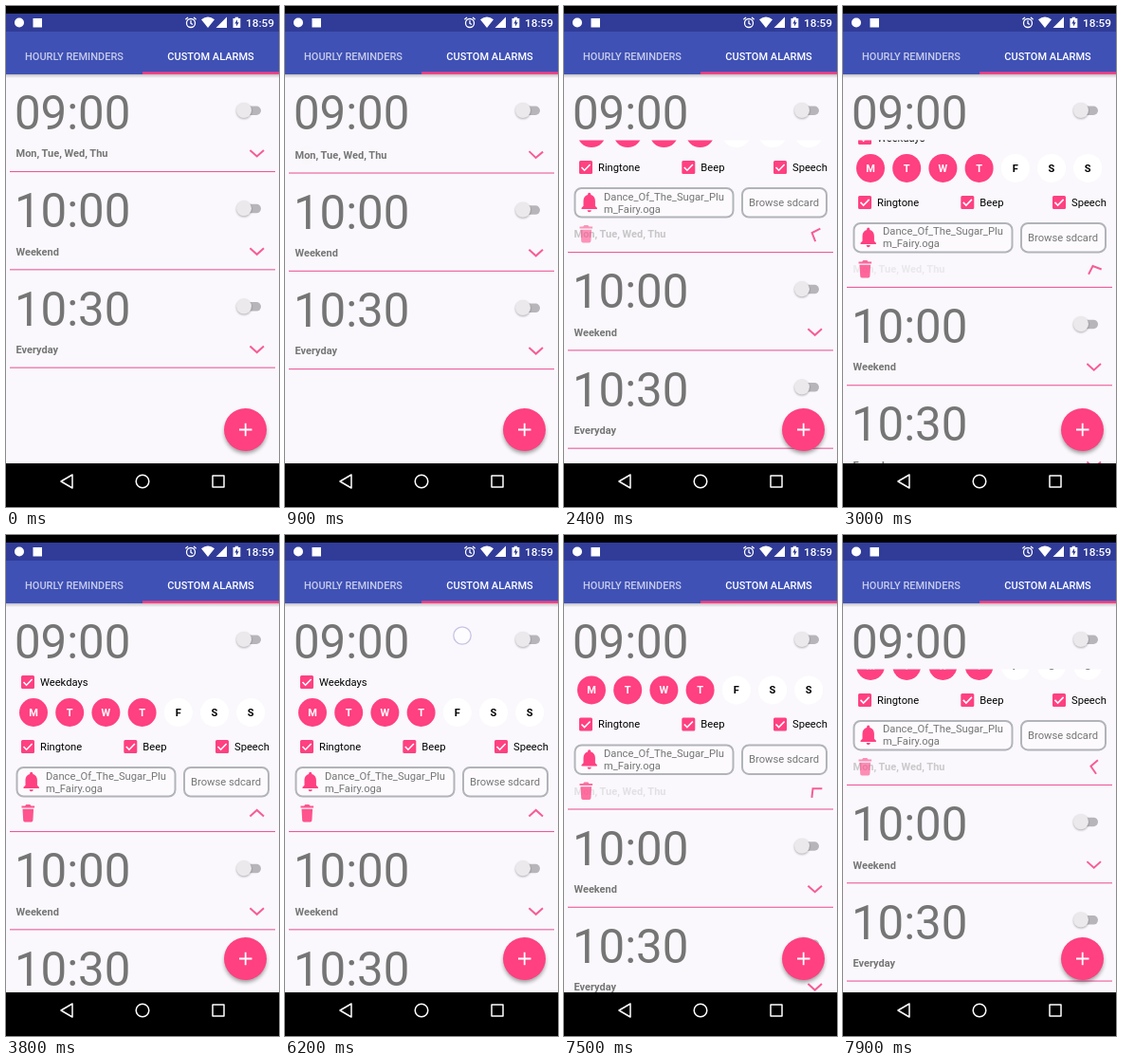
An HTML page that plays this animation: 288 px wide and 528 px high, repeating every 8000 ms.

```html
<!DOCTYPE html>
<html lang="en">
<head>
<meta charset="utf-8">
<title>Custom alarms</title>
<style>
  html, body { margin: 0; width: 100%; height: 100%; overflow: hidden; background: #000; }
  svg { display: block; width: 288px; height: 528px; }
  text { font-family: Roboto, "Liberation Sans", sans-serif; font-size: 11.2px; }
  .tab { font-size: 11px; font-weight: 500; fill: #fff; text-anchor: middle; }
  .time { font-size: 49.2px; fill: #757575; }
  .days { font-size: 11px; font-weight: 700; fill: #757575; }
  .day { font-size: 11px; font-weight: 700; text-anchor: middle; }
  .note { fill: #757575; }
  .box { fill: #fcfafd; stroke: #b1b4b9; stroke-width: 2; }
  .line { fill: #ec5a9a; }
  .arrow { fill: none; stroke: #f75c97; stroke-width: 2; }
</style>
</head>
<body>
<svg viewBox="0 0 288 528">
  <defs>
    <clipPath id="page"><rect y="72" width="288" height="410"/></clipPath>
    <clipPath id="below"><rect y="141.5" width="288" height="341"/></clipPath>
    <linearGradient id="shade" x2="0" y2="1">
      <stop stop-color="#000" stop-opacity=".22"/>
      <stop offset="1" stop-color="#000" stop-opacity="0"/>
    </linearGradient>
    <filter id="blur" x="-50%" y="-50%" width="200%" height="200%"><feGaussianBlur stdDeviation="2.2"/></filter>
    <filter id="soft" x="-50%" y="-50%" width="200%" height="200%"><feGaussianBlur stdDeviation=".8"/></filter>

    <g id="switch">
      <rect x="247" y="105.5" width="22" height="9.5" rx="4.75" fill="#b7b5b9"/>
      <circle cx="251" cy="111" r="8" fill="#000" opacity=".3" filter="url(#soft)"/>
      <circle cx="251" cy="110" r="8" fill="#ebe9ec"/>
    </g>
    <path id="chevron" class="arrow" d="M-7.3 -3.3L0 3.3L7.3 -3.3"/>
    <g id="check">
      <rect x="-7" y="-7" width="14" height="14" rx="1.5" fill="#ff4081"/>
      <path d="M-4.5 0L-1.4 3.2L4.6 -3" fill="none" stroke="#fff" stroke-width="1.6"/>
    </g>
  </defs>

  <rect y="8" width="288" height="474" fill="#faf8fc"/>

  <g clip-path="url(#page)">
    <g id="first"></g>
    <g clip-path="url(#below)"><g id="panel"></g></g>
    <g id="foot"></g>
    <g id="rest"></g>
    <circle id="touch" cx="187" cy="106" r="9.2" fill="#fff" fill-opacity=".6" stroke="#c6c2e4" stroke-width="1.3"/>
    <rect y="72" width="288" height="4" fill="url(#shade)"/>
    <circle cx="252.5" cy="449.5" r="22" fill="#000" opacity=".38" filter="url(#blur)"/>
    <circle cx="252.5" cy="446.5" r="22.5" fill="#ff4081"/>
    <path d="M246 446.5h13.5M252.7 439.8v13.5" stroke="#fff" stroke-width="1.8"/>
  </g>

  <rect y="8" width="288" height="19" fill="#303c98"/>
  <rect y="27" width="288" height="45" fill="#3f51b5"/>
  <rect x="144" y="69.5" width="144" height="2.5" fill="#ff4081"/>
  <text class="tab" x="72" y="57" opacity=".7">HOURLY REMINDERS</text>
  <text class="tab" x="216" y="57">CUSTOM ALARMS</text>

  <g fill="#fff">
    <circle cx="14" cy="17.5" r="5"/>
    <rect x="28.5" y="13" width="9.5" height="9.5"/>
    <path d="M206 14.2Q213 9 220 14.2L213 23Z"/>
    <path d="M233 11.5V23H221.5Z"/>
    <path d="M239.5 13h2.2v-1.3h3.4v1.3h2.2v10h-7.8z"/>
    <path d="M244 14.2l-2.7 4.2h1.7v3.2l2.7-4.4h-1.7z" fill="#303c98"/>
    <text x="253" y="21.8" style="font-size:11.8px;font-weight:500">18:59</text>
  </g>
  <g fill="none" stroke="#fff" stroke-width="1.3">
    <circle cx="195" cy="18" r="4.5"/>
    <path d="M195 15.3v3l2 1.2M189.4 14.2l2.6-2.2M200.6 14.2l-2.6-2.2"/>
  </g>

  <rect y="482" width="288" height="46"/>
  <g fill="none" stroke="#fff" stroke-width="1.5" stroke-linejoin="round">
    <path d="M58 501L70 494V508Z"/>
    <circle cx="144" cy="501" r="6.8"/>
    <rect x="218" y="495" width="12" height="12"/>
  </g>
</svg>

<script>
const LOOP = 8000, STEP = 100;
const SLIDE = 2950, OPEN_AT = 705, CLOSE_AT = 6700;
const DROP = 138, ROW = 103.3;
const $ = id => document.getElementById(id);

const header = (time, y = 0) =>
  `<text class="time" x="8.9" y="${130 + y}">${time}</text><use href="#switch" y="${y}"/>`;
const footer = (days, y = 0) =>
  `<text class="days" x="10.5" y="${159.3 + y}">${days}</text>` +
  `<use href="#chevron" x="264.7" y="${155.2 + y}"/>` + rule(y);
const rule = y => `<rect class="line" x="4" y="${174 + y}" width="280" height="1.1"/>`;
const option = (x, y, label) =>
  `<use href="#check" x="${x}" y="${y}"/><text x="${x + 13}" y="${y + 4}">${label}</text>`;
const day = (letter, i) => {
  const x = 29 + i * 38.2, on = i < 4;
  return `<circle cx="${x}" cy="187" r="15" fill="${on ? "#ff4081" : "#fff"}"/>` +
    `<text class="day" x="${x}" y="191" fill="${on ? "#fff" : "#000"}">${letter}</text>`;
};

$("first").innerHTML = header("09:00");

$("panel").innerHTML =
  option(23, 155, "Weekdays") + [..."MTWTFSS"].map(day).join("") +
  option(23, 223, "Ringtone") + option(131.3, 223, "Beep") + option(228, 223, "Speech") +
  `<rect class="box" x="11.5" y="245" width="167" height="30.5" rx="7"/>
   <rect class="box" x="188" y="245" width="89" height="30.5" rx="7"/>
   <path fill="#ff4081" d="M18.5 267v-1.2l2-2v-5.3c0-3.5 1.8-5.8 4.6-6.5v-.7a1.6 1.6 0 0 1 3.2 0v.7
     c2.8.7 4.6 3 4.6 6.5v5.3l2 2v1.2zM24.6 268.2h4.2a2.1 2.1 0 0 1-4.2 0z"/>
   <text class="note" x="42" y="257.5">Dance_Of_The_Sugar_Plu</text>
   <text class="note" x="42" y="270.5">m_Fairy.oga</text>
   <text class="note" x="195" y="264">Browse sdcard</text>`;

$("foot").innerHTML =
  `<text id="summary" class="days" x="10.5" y="159.3">Mon, Tue, Wed, Thu</text>
   <path id="bin" fill="#ff4081" d="M16.5 147.5h3.6l1.2-1.4h4l1.2 1.4h3.6v2h-13.6z
     M17.5 150.8h11.6l-.7 12a1.8 1.8 0 0 1-1.8 1.7h-6.6a1.8 1.8 0 0 1-1.8-1.7z"/>
   <use id="turn" href="#chevron"/>` + rule(0);

$("rest").innerHTML =
  header("10:00", ROW) + footer("Weekend", ROW) +
  header("10:30", 2 * ROW) + footer("Everyday", 2 * ROW);

const clamp = v => Math.min(1, Math.max(0, v));
const ease = v => (1 - Math.cos(Math.PI * clamp(v))) / 2;
const shift = (id, y) => $(id).setAttribute("transform", `translate(0 ${y.toFixed(2)})`);

function draw(t) {
  const closing = t >= CLOSE_AT;
  const open = closing ? 1 - ease((t - CLOSE_AT) / SLIDE) : ease((t - OPEN_AT) / SLIDE);
  const y = DROP * open;
  shift("panel", y - DROP);
  shift("foot", y);
  shift("rest", y);
  $("summary").setAttribute("opacity", 1 - open);
  $("bin").setAttribute("opacity", open * 0.9);
  // the arrow turns back a little ahead of the panel
  const angle = 180 * (closing ? open ** 1.4 : open);
  $("turn").setAttribute("transform", `translate(264.7 155.2) rotate(${angle.toFixed(2)})`);
  $("touch").setAttribute("opacity", t < 6200 ? 0 : clamp(1 - (t - 6700) / 700));
}

const start = performance.now();
function tick(now) {
  const t = Math.max(0, now - start) % LOOP;
  draw(Math.floor(t / STEP) * STEP);
  requestAnimationFrame(tick);
}
draw(0);
requestAnimationFrame(tick);
</script>
</body>
</html>
```
